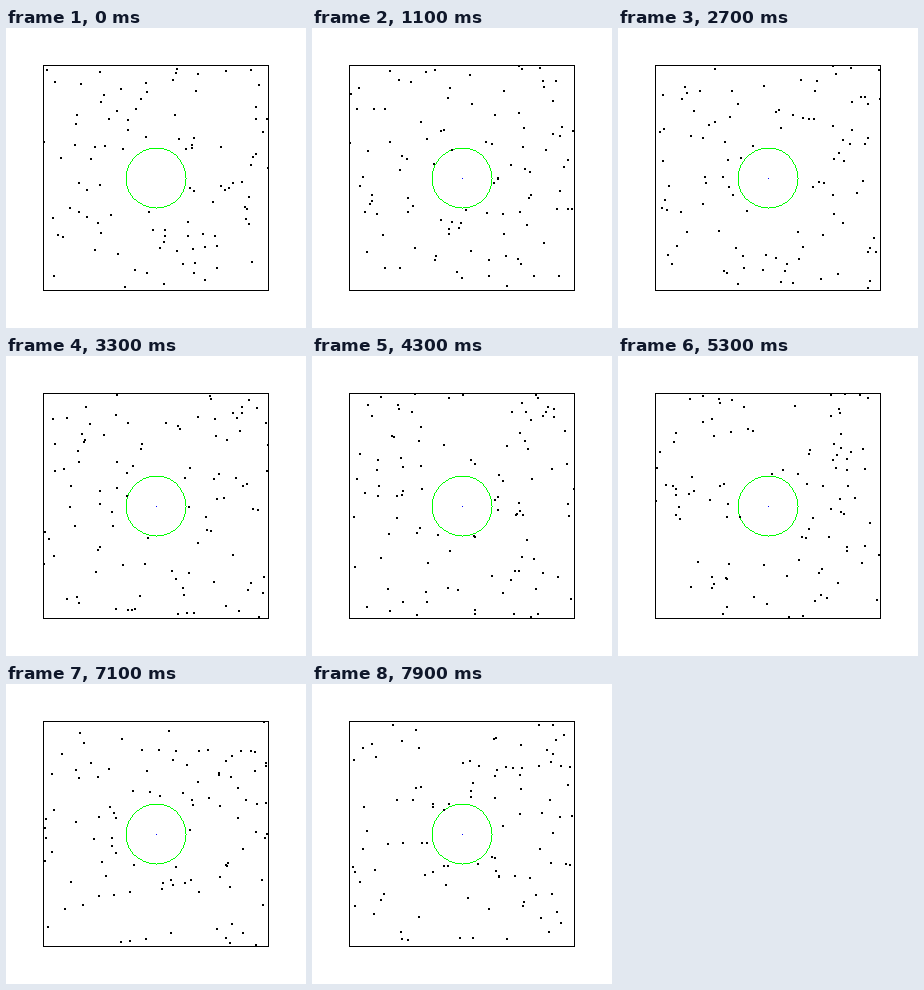
Write an HTML page with a canvas that moves like this. It is 300x300 px and loops after 8000 ms.

```html
<!DOCTYPE html>
<html lang="en">
<head>
<meta charset="utf-8">
<title>Gas around a disc</title>
<style>
  html, body { margin: 0; width: 100%; height: 100%; overflow: hidden; background: #fff; }
  canvas { display: block; width: 300px; height: 300px; image-rendering: pixelated; }
</style>
</head>
<body>
<canvas id="stage" width="300" height="300"></canvas>
<script>
const ctx = document.getElementById('stage').getContext('2d');
const MIN = 37.5, MAX = 262, MID = 150, RADIUS = 30;
const COUNT = 100, STEPS = 80, STEP_MS = 100;

let seed = 71;
function random() {
  seed = (seed * 16807) % 2147483647;
  return seed / 2147483647;
}

function makeParticle() {
  let x, y;
  do {
    x = MIN + random() * (MAX - MIN);
    y = MIN + random() * (MAX - MIN);
  } while (Math.hypot(x - MID, y - MID) < RADIUS + 1);
  const angle = random() * 2 * Math.PI, speed = 2 + random() * 3;
  return { x, y, vx: speed * Math.cos(angle), vy: speed * Math.sin(angle) };
}

function bounceWall(p, axis, v) {
  const wall = p[axis] < MIN ? MIN : p[axis] > MAX ? MAX : null;
  if (wall === null) return;
  p[axis] = 2 * wall - p[axis];
  p[v] = Math.abs(p[v]) * (wall === MIN ? 1 : -1);
}

function bounceDisc(p) {
  const dx = p.x - MID, dy = p.y - MID, d = Math.hypot(dx, dy);
  if (d >= RADIUS) return;
  const nx = dx / d, ny = dy / d, inward = Math.min(0, p.vx * nx + p.vy * ny);
  p.vx -= 2 * inward * nx;
  p.vy -= 2 * inward * ny;
  p.x += 2 * (RADIUS - d) * nx;
  p.y += 2 * (RADIUS - d) * ny;
}

function move(p) {
  p.x += p.vx;
  p.y += p.vy;
  bounceWall(p, 'x', 'vx');
  bounceWall(p, 'y', 'vy');
  bounceDisc(p);
}

// Positions for every step, so that each picture depends on the time alone.
const particles = Array.from({ length: COUNT }, makeParticle);
const history = Array.from({ length: STEPS }, () => {
  const places = particles.map(p => [Math.round(p.x), Math.round(p.y)]);
  particles.forEach(move);
  return places;
});

function dot(x, y, size, color) {
  ctx.fillStyle = color;
  ctx.fillRect(x, y, size, size);
}

// One-pixel circle without antialiasing, rounded towards the top left.
function drawCircle() {
  for (let i = -21; i <= 21; i++) {
    const h = Math.sqrt(RADIUS * RADIUS - i * i);
    for (const edge of [Math.floor(MID - h), Math.floor(MID + h)]) {
      dot(MID + i, edge, 1, '#0f0');
      dot(edge, MID + i, 1, '#0f0');
    }
  }
}

function draw(step) {
  ctx.fillStyle = '#fff';
  ctx.fillRect(0, 0, 300, 300);
  ctx.strokeStyle = '#000';
  ctx.strokeRect(37.5, 37.5, 225, 225);
  drawCircle();
  if (step > 0) dot(MID, MID, 1, '#00f');
  for (const [x, y] of history[step]) dot(x - 1, y - 1, 2, '#000');
}

const began = performance.now();
function tick() {
  draw(Math.floor((performance.now() - began) / STEP_MS) % STEPS);
  requestAnimationFrame(tick);
}
tick();
</script>
</body>
</html>
```
